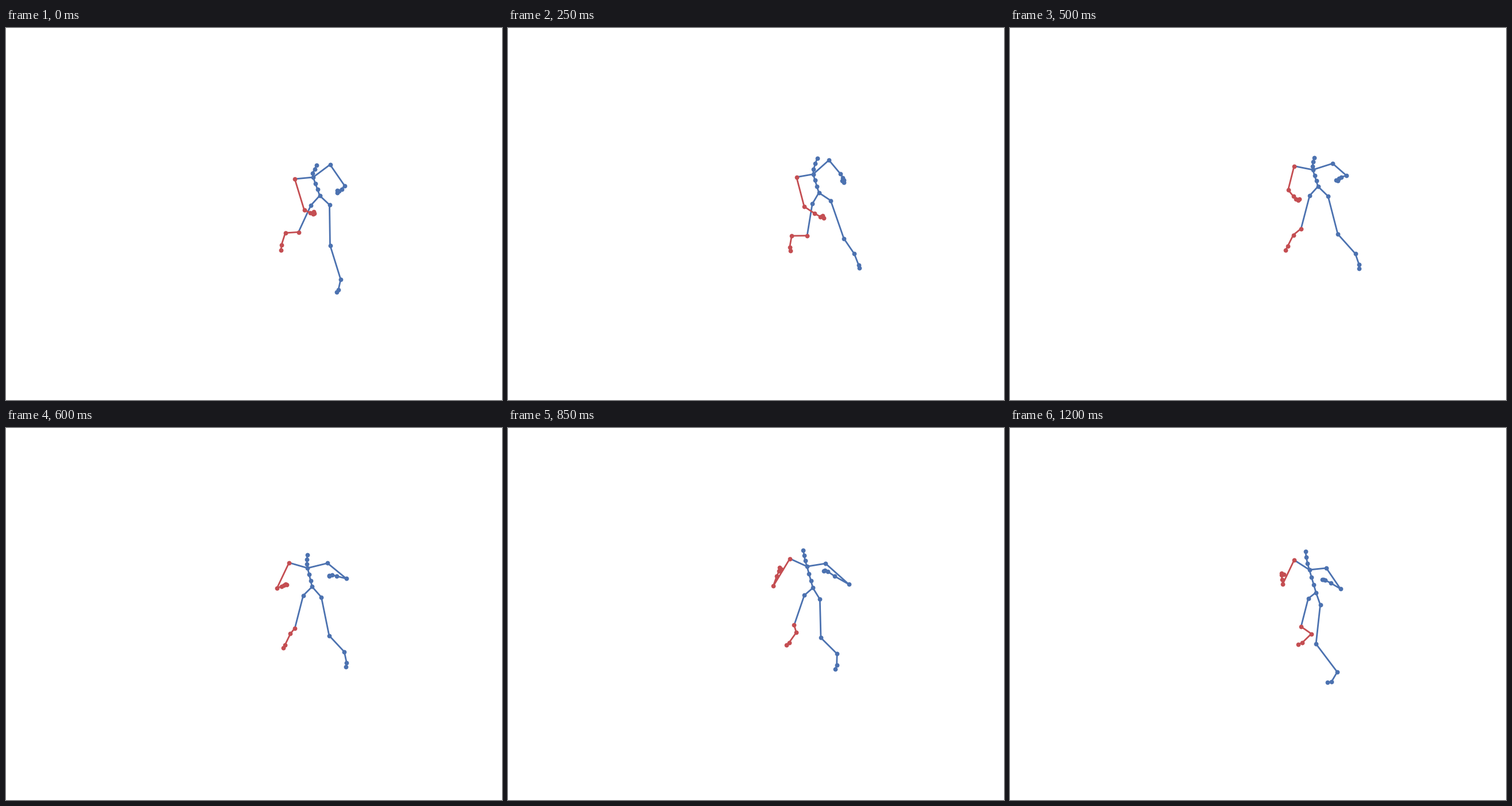
These frames come from a looping animation (864x648 px, 1.25 s). A matplotlib script:

```python
import numpy as np
import matplotlib.pyplot as plt
from matplotlib.animation import FuncAnimation

W, H, DPI = 864, 648, 72
FRAMES, INTERVAL = 25, 50
BLUE, RED = "#4C72B0", "#C44E52"

# Frame numbers of the key poses; each joint row below holds one x, y pair per key
KEYS = np.array([0, 3, 7, 10, 14, 20, 24])


def track(*rows):
    return np.array(rows, float).reshape(-1, len(KEYS), 2)


# pelvis, neck, nape, head
TRUNK = track(
    (546.5, 292, 543, 290, 540, 283, 536.5, 276, 530.5, 278.5, 533, 279.5, 533, 286.5),
    (535, 260, 532, 256, 531, 253, 527.5, 247, 523.5, 242, 519.5, 242.5, 521.5, 247),
    (534, 253, 532, 247, 532, 245, 527, 240.5, 521.5, 233.5, 515.5, 231.5, 518, 235.5),
    (541, 239, 538.5, 230, 537.5, 225.5, 529.5, 225.5, 520.5, 215.5, 511, 213.5, 514.5, 214.5),
)
# shoulder, elbow, wrist, palm, fingertip, thumb
RIGHT_ARM = track(
    (503, 263, 503.5, 261, 500.5, 256, 495, 240.5, 492, 231, 491.5, 227, 495, 230),
    (519.5, 317, 524, 315.5, 503.5, 303, 484.5, 282, 463, 278.5, 467.5, 273, 475, 272),
    (529.5, 321.5, 539.5, 321, 521.5, 320, 493.5, 293, 471, 262.5, 471, 261.5, 474, 263.5),
    (534.5, 323.5, 547.5, 323.5, 531.5, 328, 498, 298, 476, 253, 473, 256, 473, 256),
    (536.5, 323, 552, 323.5, 537.5, 331.5, 502, 299.5, 478, 248, 473.5, 250, 473, 252.5),
    (536, 320, 550, 320.5, 536.5, 328, 503.5, 298, 480, 251.5, 476.5, 252.5, 476.5, 255),
)
LEFT_ARM = track(
    (564.5, 238, 557.5, 230, 562, 232.5, 562, 236, 557.5, 234.5, 550, 239, 551, 244),
    (590, 275, 588, 259, 573, 253, 586, 257, 597, 268, 585.5, 275, 575.5, 280),
    (584.5, 280.5, 587, 263, 579, 261.5, 577, 259.5, 574, 257, 563, 261.5, 558.5, 270),
    (580, 284, 585, 267, 582, 265.5, 573, 262, 563, 250.5, 552, 254, 549, 265),
    (576.5, 286.5, 583, 269.5, 584, 271, 571, 266, 557, 250.5, 546, 253.5, 544, 263.5),
    (576.5, 282.5, 581, 266, 580, 268.5, 568, 264.5, 559, 250, 547, 251.5, 546, 264),
)
# hip, knee, ankle, foot, toe
RIGHT_LEG = track(
    (531, 309, 532, 311, 527, 300, 522, 292, 514.5, 293, 519.5, 291, 519.5, 297),
    (509.5, 355.5, 520.5, 366.5, 517.5, 354, 507, 349.5, 501, 348, 499, 340.5, 507, 346),
    (486.5, 357, 490, 361.5, 497, 361.5, 493.5, 360.5, 499, 356, 508, 357.5, 525, 358.5),
    (480, 377.5, 487.5, 383, 491, 380, 484, 379.5, 490, 375.5, 492, 373, 509, 374),
    (479, 386.5, 489, 391, 491.5, 384.5, 480, 387, 488, 378.5, 484, 378.5, 502, 377),
)
LEFT_LEG = track(
    (563.5, 308, 564, 303.5, 559, 297.5, 554, 293, 545, 297.5, 543, 300, 540.5, 308),
    (564.5, 378.5, 582.5, 372, 582, 362, 571, 359, 555, 365, 537.5, 366.5, 533, 376),
    (583, 438, 599, 397.5, 604, 396.5, 601.5, 393, 576.5, 388.5, 574.5, 404, 570, 425),
    (579, 456, 606, 417.5, 610, 415, 608, 412, 577.5, 408, 572, 423.5, 560, 442),
    (575.5, 459.5, 607, 422, 610.5, 420, 608, 419, 575.5, 413.5, 568.5, 431, 553, 443),
)
HAND_PATH = [0, 1, 2, 3, 4, 3, 5]
GAP = np.full((1, 2), np.nan)


def pose(points, frame):
    """Smooth Hermite interpolation between the key poses."""
    slope = np.gradient(points, KEYS, axis=1, edge_order=2)
    i = min(np.searchsorted(KEYS, frame, side="right") - 1, len(KEYS) - 2)
    h = KEYS[i + 1] - KEYS[i]
    u = (frame - KEYS[i]) / h
    blend = u * u * (3 - 2 * u)
    return ((1 - blend) * points[:, i] + blend * points[:, i + 1]
            + h * u * (1 - u) ** 2 * slope[:, i]
            - h * u * u * (1 - u) * slope[:, i + 1])


def join(*paths):
    """Chain several polylines into one, broken by gaps."""
    return np.vstack([part for path in paths for part in (path, GAP)])


fig = plt.figure(figsize=(W / DPI, H / DPI), dpi=DPI, facecolor="white")
ax = fig.add_axes([0, 0, 1, 1])
ax.set(xlim=(0, W), ylim=(H, 0))
ax.axis("off")


def bones(color, z):
    return ax.plot([], [], color=color, lw=2.8, zorder=z)[0]


def joints(color, z):
    return ax.plot([], [], "o", color=color, ms=7.8, mew=0, zorder=z)[0]


blue_bones, blue_joints = bones(BLUE, 1), joints(BLUE, 2)
red_bones, red_joints = bones(RED, 3), joints(RED, 4)


def draw(frame):
    pelvis, neck, nape, head = pose(TRUNK, frame)
    r_arm, l_arm = pose(RIGHT_ARM, frame), pose(LEFT_ARM, frame)
    r_leg, l_leg = pose(RIGHT_LEG, frame), pose(LEFT_LEG, frame)

    spine = np.vstack([np.linspace(pelvis, neck, 4), nape, (nape + head) / 2, head])
    blue_bones.set_data(*join(
        spine,
        np.vstack([neck, l_arm[HAND_PATH]]),
        np.vstack([neck, r_arm[:1]]),
        np.vstack([pelvis, l_leg]),
        np.vstack([pelvis, r_leg[:2]]),
    ).T)
    blue_joints.set_data(*np.vstack([spine, l_arm, l_leg, r_leg[:1]]).T)
    red_bones.set_data(*join(r_arm[HAND_PATH], r_leg[1:]).T)
    red_joints.set_data(*np.vstack([r_arm, r_leg[1:]]).T)
    return blue_bones, blue_joints, red_bones, red_joints


anim = FuncAnimation(fig, draw, frames=FRAMES, interval=INTERVAL,
                     repeat=True, repeat_delay=0, blit=False)
plt.show()
```
